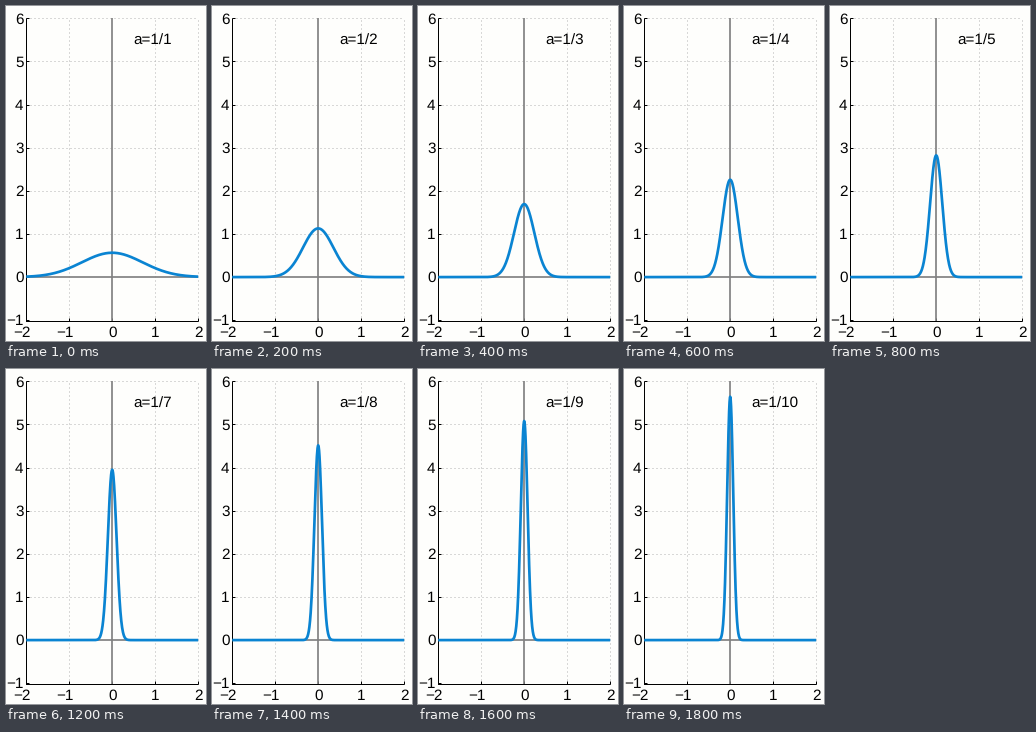
A matplotlib script for the animation above (2 s loop, 200 by 335 pixels).

```python
import numpy as np
import matplotlib.pyplot as plt
from matplotlib.animation import FuncAnimation

W, H, DPI = 200, 335, 100
PX = 72 / DPI
X0, Y0 = 106.2, 271.1      # origin of the plot in pixels
SX, SY = 43, 43.14         # pixels per unit
LEFT, RIGHT = X0 - 2 * SX, X0 + 2 * SX
TOP, BOTTOM = Y0 - 6 * SY, 314.6
PAPER, INK, GREY, DOTS, BLUE = "#fefefc", "#000000", "#808080", "#b4b4b4", "#0a84d2"

plt.rcParams["font.family"] = "Liberation Sans"
plt.rcParams["text.hinting"] = "none"

fig = plt.figure(figsize=(W / DPI, H / DPI), dpi=DPI, facecolor=PAPER)
ax = fig.add_axes([0, 0, 1, 1])
ax.set_xlim(0, W)
ax.set_ylim(H, 0)
ax.axis("off")


def line(xs, ys, color, width, **kw):
    kw.setdefault("solid_capstyle", "butt")
    return ax.plot(xs, ys, color=color, lw=width * PX, **kw)[0]


def label(x, y, text, ha):
    return ax.text(x, y, text, ha=ha, va="baseline", size=15.3 * PX, color=INK)


def name(n):
    return str(n).replace("-", "\u2212")


dotted = dict(linestyle=(0, (1, 3)), dash_capstyle="butt")

for n in range(-2, 3):
    x = X0 + n * SX
    if n:
        line([x, x], [BOTTOM, TOP], DOTS, 1, **dotted)
    line([x, x], [BOTTOM, BOTTOM - 3], INK, 1)
    label(x - (4.7 if n < 0 else 0), 331, name(n), "center")

for n in range(-1, 7):
    y = Y0 - n * SY
    if n > 0:
        line([LEFT, RIGHT], [y, y], DOTS, 1, **dotted)
    line([LEFT, LEFT + 3], [y, y], INK, 1)
    label(17.6, y + 5.2, name(n), "right")

line([LEFT, RIGHT], [Y0, Y0], GREY, 1.7)
line([X0, X0], [TOP, BOTTOM], GREY, 1.7)
line([LEFT, LEFT, RIGHT], [TOP, BOTTOM, BOTTOM], INK, 1)

xs = np.linspace(-2, 2, 801)
curve = line([], [], BLUE, 2.7, zorder=5, solid_joinstyle="round")
caption = label(127.5, 39, "", "left")


def draw(i):
    n = i + 1
    ys = n / np.sqrt(np.pi) * np.exp(-(n * xs) ** 2)
    curve.set_data(X0 + SX * xs, Y0 - SY * ys)
    caption.set_text(f"a=1/{n}")
    return curve, caption


anim = FuncAnimation(fig, draw, frames=10, interval=200, repeat=True, repeat_delay=0)
plt.show()
```
